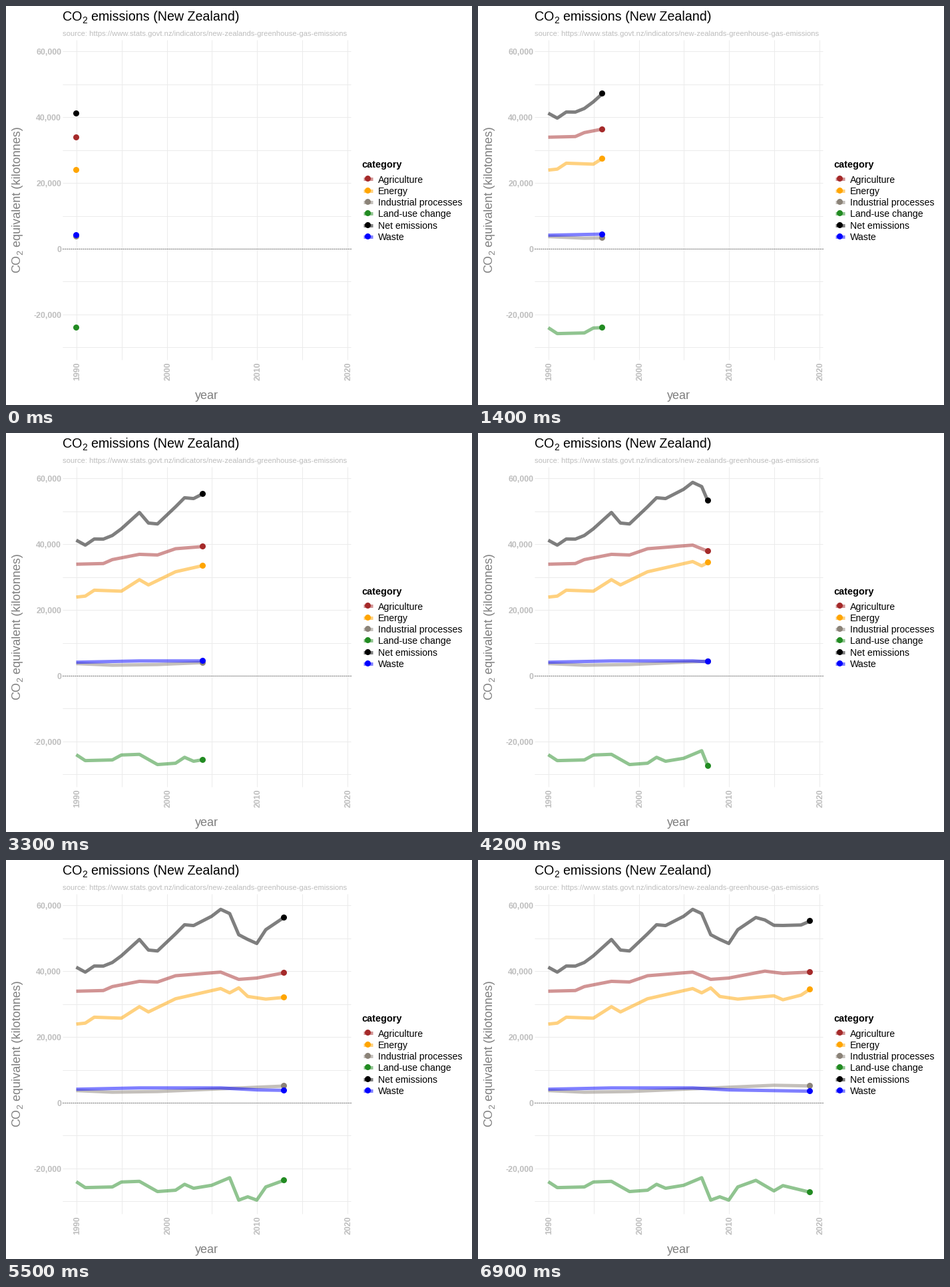
Recreate the animation shown at these times as a matplotlib script. Size 700x600 px, loop 10 s.

```python
import matplotlib.pyplot as plt
import numpy as np
from matplotlib.animation import FuncAnimation
from matplotlib.patches import Circle

W, H, DPI = 700, 600, 100
PT = 72 / DPI                      # points per pixel
LEFT, RIGHT, TOP, BOTTOM = 85, 518, 51, 532
STEPS, HOLD = 69, 30               # moving steps, then still frames
GRID, PALE, MID = "#ebebeb", "#bebebe", "#7f7f7f"

plt.rcParams["font.family"] = "Liberation Sans"

years = np.arange(30)              # years since 1990
keys = np.round(STEPS * years / 29)


def curve(*points):
    """Yearly values from (year, thousand kilotonnes) turning points."""
    return np.interp(years, *zip(*points))


agriculture = curve((0, 33.8), (3, 34.0), (4, 35.2), (7, 36.8), (9, 36.6),
                    (11, 38.5), (16, 39.6), (18, 37.4), (20, 37.8),
                    (24, 39.9), (26, 39.2), (29, 39.6))
energy = curve((0, 23.8), (1, 24.1), (2, 25.9), (5, 25.6), (7, 29.1),
               (8, 27.5), (11, 31.5), (16, 34.6), (17, 33.3), (18, 34.8),
               (19, 32.2), (21, 31.4), (25, 32.4), (26, 31.2), (28, 32.6),
               (29, 34.4))
land = curve((0, -24.1), (1, -25.9), (4, -25.7), (5, -24.2), (7, -24.0),
             (9, -27.1), (11, -26.7), (12, -24.9), (13, -26.1), (15, -25.2),
             (17, -22.9), (18, -29.7), (19, -28.7), (20, -29.7), (21, -25.7),
             (23, -23.7), (25, -26.9), (26, -25.3), (29, -27.3))
industry = curve((0, 3.6), (4, 3.1), (9, 3.3), (25, 5.2), (29, 5.0))
waste = curve((0, 4.0), (7, 4.4), (16, 4.4), (20, 3.8), (29, 3.4))
net = agriculture + energy + land + industry + waste

SERIES = [
    ("Agriculture", "#a52a2a", agriculture),
    ("Energy", "#ffa500", energy),
    ("Industrial processes", "#8b8378", industry),
    ("Land-use change", "#228b22", land),
    ("Net emissions", "#000000", net),
    ("Waste", "#0000ff", waste),
]


def px(year):
    return 105.5 + 13.56 * np.asarray(year)


def py(value):
    return 364.5 - 4.947 * np.asarray(value)


def snap(v):
    return np.floor(v) + 0.5


fig = plt.figure(figsize=(W / DPI, H / DPI), dpi=DPI, facecolor="white")
ax = fig.add_axes([0, 0, 1, 1])
ax.set_xlim(0, W)
ax.set_ylim(H, 0)
ax.axis("off")


def label(x, y, text, size, color="black", **kw):
    ax.text(x, y, text, fontsize=size * PT, color=color, va="baseline",
            rotation_mode="anchor", **kw)


def stroke(x, y, color, width=1, **kw):
    return ax.plot(x, y, color=color, lw=width * PT, solid_capstyle="butt",
                   solid_joinstyle="round", **kw)[0]


def dot(x, y, color, z):
    return ax.add_patch(Circle((snap(x), snap(y)), 4.5, fc=color, lw=0,
                               zorder=z))


def co2_label(x, y, rest, size, color, angle=0):
    """Write CO2 with a lowered digit, then the rest of the line."""
    c, s = np.cos(np.radians(angle)), np.sin(np.radians(angle))
    parts = [("CO", 0, 0, 1), ("2", 1.5, 0.2, 0.7), (rest, 2.167, 0, 1)]
    for text, along, drop, scale in parts:
        label(x + size * (along * c + drop * s),
              y + size * (drop * c - along * s),
              text, size * scale, color, rotation=angle)


# Grid and axes
for v in range(-30, 61, 10):
    stroke([LEFT, RIGHT], [snap(py(v))] * 2, GRID, zorder=1)
for k in range(0, 31, 5):
    stroke([snap(px(k))] * 2, [TOP, BOTTOM], GRID, zorder=1)
stroke([LEFT, RIGHT], [364.5] * 2, "black", zorder=2,
       linestyle=(0, (1, 2)), dash_capstyle="butt")

for v in range(-20, 61, 20):
    label(83, snap(py(v)) + 5.3, f"{v * 1000:,}", 12.4, PALE, ha="right",
          weight="bold")
for k in range(0, 31, 10):
    label(snap(px(k)) + 5, 563, str(1990 + k), 12.4, PALE, weight="bold",
          rotation=90)

# Titles
co2_label(85, 22, "emissions (New Zealand)", 19.7, "black")
label(85, 45, "source: https://www.stats.govt.nz/indicators/"
      "new-zealands-greenhouse-gas-emissions", 11.27, PALE)
label(301.5, 591, "year", 18, MID, ha="center")
co2_label(21.5, 401, "equivalent (kilotonnes)", 18, MID, angle=90)

# Legend, with one line and dot per series
label(534, 243, "category", 14.5, weight="bold")
lines, dots = [], []
for i, (name, color, values) in enumerate(SERIES):
    y = 259.9 + 17.28 * i
    stroke([536.5, 550.5], [snap(y)] * 2, color, 5, alpha=0.5, zorder=3)
    dot(543.5, y, color, 4)
    label(559, y + 5.7, name, 14.1)
    lines.append(stroke([], [], color, 5, alpha=0.5, zorder=3 + i / 10))
    dots.append(dot(px(0), py(values[0]), color, 4 + i / 10))


def draw(n):
    pos = np.interp(n, keys, years)
    t = np.append(years[years < pos], pos)
    for line, point, (_, _, values) in zip(lines, dots, SERIES):
        y = py(np.interp(t, years, values))
        line.set_data(px(t), y)
        point.center = snap(px(pos)), snap(y[-1])
    return lines + dots


anim = FuncAnimation(fig, draw, frames=STEPS + 1 + HOLD, interval=100,
                     init_func=lambda: draw(0), repeat=True, repeat_delay=0)
plt.show()
```
